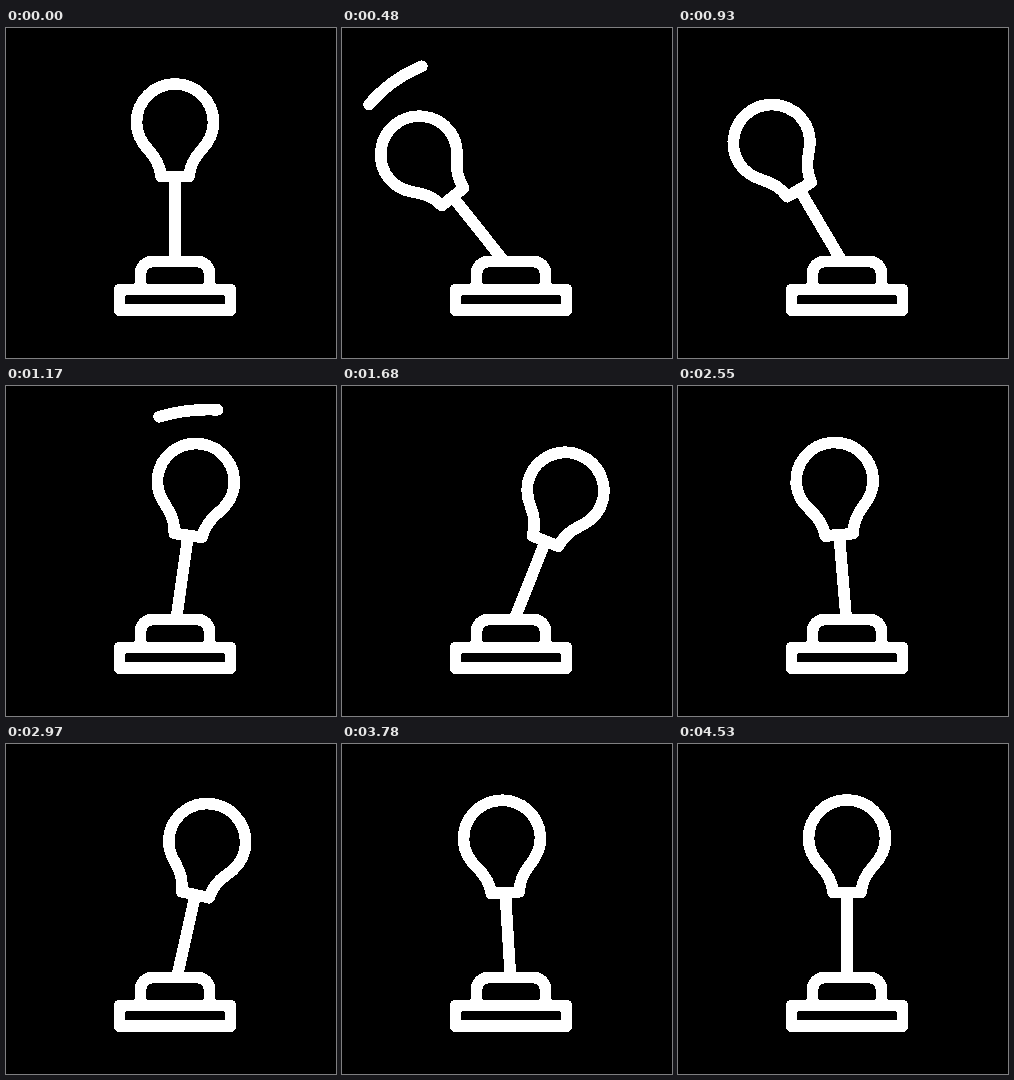
These frames come from a looping animation (330 px wide and 330 px high, 5.4 s). An HTML page with a canvas:

```html
<!DOCTYPE html>
<html lang="en">
<head>
<meta charset="utf-8">
<title>Swinging punch ball</title>
<style>
  html, body { margin: 0; width: 100%; height: 100%; overflow: hidden; background: #000; }
  /* The filter turns soft edges into hard ones */
  canvas { display: block; width: 330px; height: 330px; filter: brightness(1.35) contrast(60); }
</style>
</head>
<body>
<canvas id="stage" width="330" height="330"></canvas>
<script>
const ctx = document.getElementById('stage').getContext('2d');
const LOOP = 5400, STEP = 30;
const PIVOT = { x: 169, y: 242 };
const RAD = Math.PI / 180;

const ball = new Path2D('M155 148.5 H183 C184 137 189 129 195 122.5 C203 114 207.5 106 207.5 94.5' +
  ' A38.5 38.5 0 0 0 130.5 94.5 C130.5 106 135 114 143 122.5 C149 129 154 137 155 148.5 Z');
const rod = new Path2D('M169 149 V242');
const base = new Path2D('M113.5 261.5 H224.5 V282.1 H113.5 Z' +
  ' M134.5 260 V245.5 A12 12 0 0 1 146.5 233.5 H191.5 A12 12 0 0 1 203.5 245.5 V260');

// Turning points of the swing: time, angle, and the ease leading there
const smooth = bezier(1 / 3, 2 / 3);
const firm = bezier(0.42, 0.58);
const swing = [
  { t: 0, a: 0 },
  { t: 600, a: -43, ease: smooth },
  { t: 1400, a: 36, ease: bezier(0.715, 0.674) },
  { t: 2245, a: -20, ease: smooth },
  { t: 2890, a: 13.1, ease: smooth },
  { t: 3590, a: -7.2, ease: firm },
  { t: 4050, a: 3.3, ease: firm },
  { t: 4380, a: -1, ease: smooth },
  { t: 4530, a: 0, ease: smooth }
];

// Speed lines: circle, angle range from the top, and times of head and tail
const trails = [
  { x: 133.3, y: 167.6, r: 140, from: -4, to: -50, head: [190, 500], tail: [350, 650] },
  { x: 202.4, y: 199.6, r: 176, from: -22, to: 28, head: [1036, 1304], tail: [1106, 1410] },
  { x: 163.4, y: 200.5, r: 176, from: 2, to: -27.5, head: [1850, 2140], tail: [1970, 2300] }
];

// Cubic ease with flat ends, solved by bisection
function bezier(x1, x2) {
  return p => {
    let lo = 0, hi = 1, s = 0.5;
    for (let i = 0; i < 30; i++) {
      s = (lo + hi) / 2;
      const q = 1 - s;
      if (3 * q * q * s * x1 + 3 * q * s * s * x2 + s * s * s < p) lo = s;
      else hi = s;
    }
    return s * s * (3 - 2 * s);
  };
}

function angleAt(t) {
  const i = swing.findIndex(k => k.t > t);
  if (i < 0) return 0;
  const a = swing[i - 1], b = swing[i];
  return a.a + (b.a - a.a) * b.ease((t - a.t) / (b.t - a.t));
}

function progress(t, [start, end]) {
  return smooth(Math.min(1, Math.max(0, (t - start) / (end - start))));
}

function drawTrail(t, trail) {
  if (t <= trail.head[0] || t >= trail.tail[1]) return;
  const at = span => (trail.from + (trail.to - trail.from) * progress(t, span) - 90) * RAD;
  ctx.beginPath();
  ctx.arc(trail.x, trail.y, trail.r, at(trail.tail), at(trail.head), trail.to < trail.from);
  ctx.stroke();
}

function draw(t) {
  ctx.fillStyle = '#000';
  ctx.fillRect(0, 0, 330, 330);
  ctx.strokeStyle = '#fff';
  ctx.lineWidth = 11.4;
  ctx.lineJoin = 'round';
  ctx.lineCap = 'round';

  trails.forEach(trail => drawTrail(t, trail));

  ctx.save();
  ctx.beginPath();
  ctx.rect(0, 0, 330, 233);
  ctx.clip();
  ctx.translate(PIVOT.x, PIVOT.y);
  ctx.rotate(angleAt(t) * RAD);
  ctx.translate(-PIVOT.x, -PIVOT.y);
  ctx.stroke(rod);
  ctx.stroke(ball);
  ctx.restore();

  ctx.lineCap = 'butt';
  ctx.stroke(base);
}

function tick() {
  const t = performance.now() % LOOP;
  draw(Math.floor(t / STEP) * STEP);
  requestAnimationFrame(tick);
}
tick();
</script>
</body>
</html>
```
